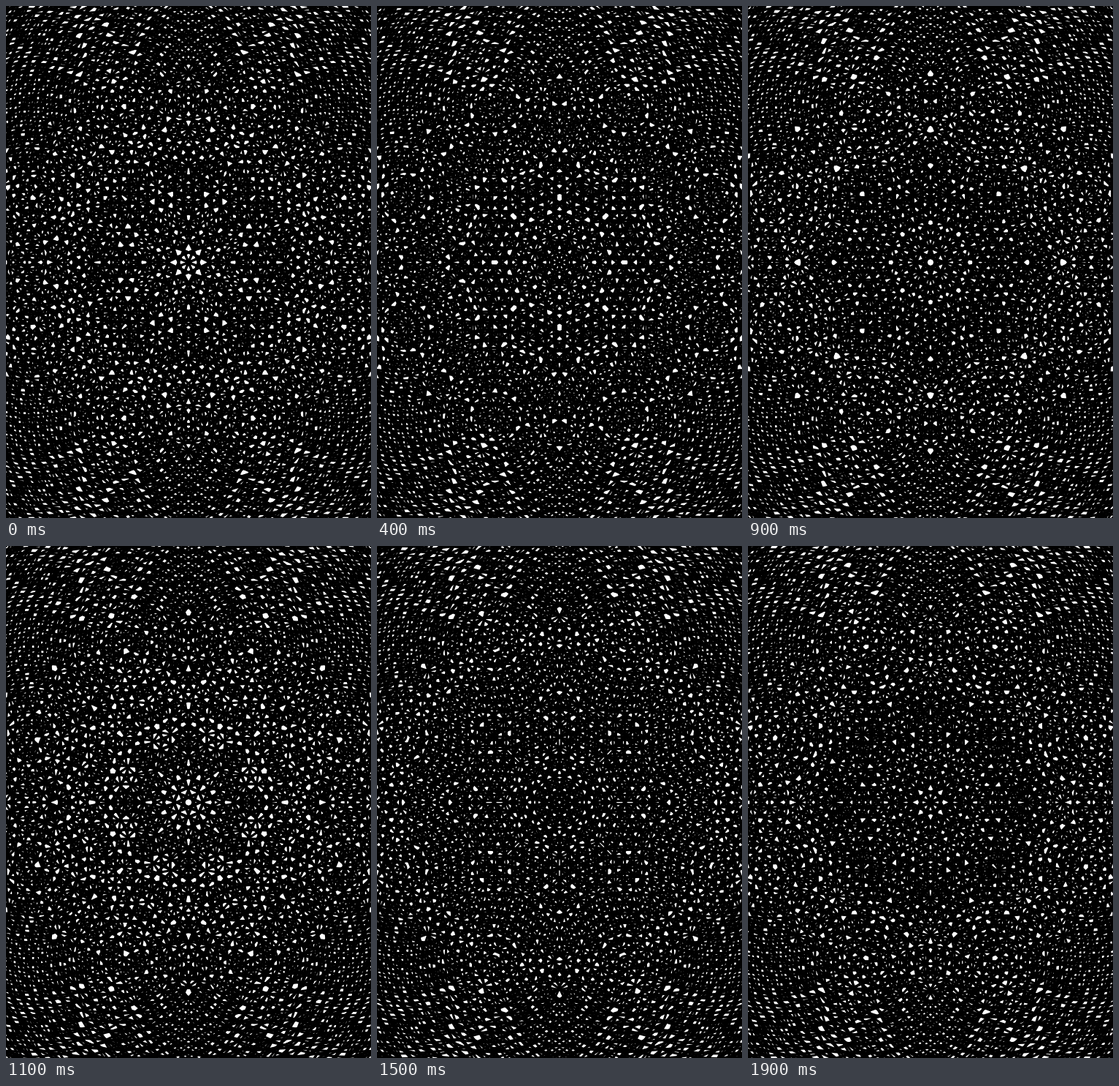
An HTML page for the animation above (2 s loop, 500 px wide and 700 px high).

```html
<!DOCTYPE html>
<html lang="en">
<head>
<meta charset="utf-8">
<title>Ring moiré</title>
<style>
  html, body { margin: 0; width: 100%; height: 100%; overflow: hidden; background: #fff; }
  svg { display: block; width: 100vw; height: 100vh; }
</style>
</head>
<body>
<svg id="stage" viewBox="0 0 500 700">
  <defs><g id="rings" fill="none" stroke="#000" stroke-width="3.2"></g></defs>
</svg>
<script>
const NS = 'http://www.w3.org/2000/svg';
const LOOP = 2000, STEP = 100;
const CX = 250, CY = 350.5;
const GAP = 12.5;            // distance between neighbouring rings
const ORBIT = 19 * GAP;      // distance of the ring centres from the middle
const SETS = 8, RINGS = 55;

function add(parent, name, attrs = {}) {
  const el = document.createElementNS(NS, name);
  for (const key in attrs) el.setAttribute(key, attrs[key]);
  return parent.appendChild(el);
}

const stage = document.getElementById('stage');
const group = document.getElementById('rings');
const rings = Array.from({ length: RINGS }, () => add(group, 'circle'));

for (let i = 0; i < SETS; i++) {
  const angle = (i + 0.5) * 2 * Math.PI / SETS;
  add(stage, 'use', {
    href: '#rings',
    x: CX + ORBIT * Math.cos(angle),
    y: CY + ORBIT * Math.sin(angle)
  });
}

// Every ring grows by one gap per loop, so the end meets the start.
function draw(ms) {
  const phase = Math.floor(ms % LOOP / STEP) * STEP / LOOP;
  rings.forEach((ring, k) => ring.setAttribute('r', (k + phase) * GAP));
}

let start = null, last = -1;
function tick(now) {
  if (start === null) start = now;
  const step = Math.floor((now - start) / STEP);
  if (step !== last) draw(now - start);
  last = step;
  requestAnimationFrame(tick);
}
draw(0);
requestAnimationFrame(tick);
</script>
</body>
</html>
```
